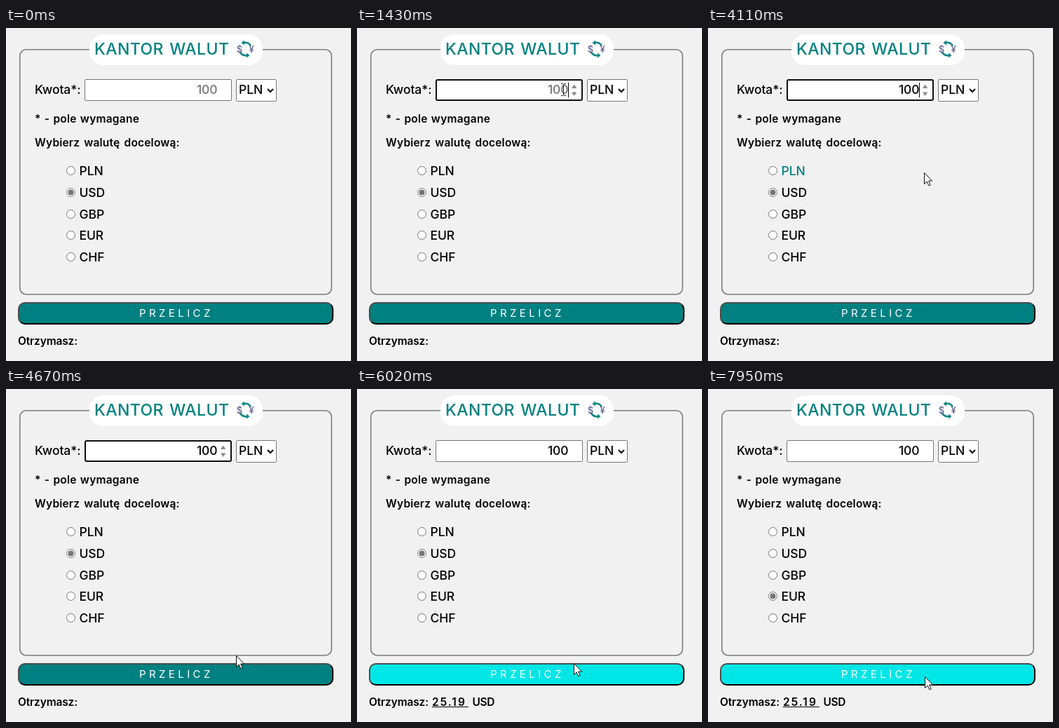
An HTML page for the animation above (8000 ms loop, 492x475 px).

```html
<!DOCTYPE html>
<html lang="pl">
<head>
<meta charset="utf-8">
<title>Kantor walut</title>
<style>
  html, body { margin: 0; width: 100%; height: 100%; overflow: hidden; background: #f1f1f1; }
  svg { display: block; width: 492px; height: 475px; font-family: Inter, "Noto Sans", sans-serif; font-weight: 500; }
  .big { font-size: 17.5px; letter-spacing: -.1px; }
  .mid { font-size: 15.5px; font-weight: 600; }
  .line { fill: none; }
</style>
</head>
<body>
<svg viewBox="0 0 492 475">
  <rect width="492" height="475" fill="#f1f1f1"/>
  <rect x="19.8" y="30.8" width="444.5" height="349.2" rx="9" class="line" stroke="#7c7c7c" stroke-width="1.6"/>
  <rect x="119" y="9" width="247" height="44" rx="20" fill="#fff"/>
  <text x="126" y="38" font-size="23" letter-spacing=".4" word-spacing="2" fill="#008080">KANTOR WALUT</text>

  <g class="line" stroke="#0d8584" stroke-width="2.5">
    <path d="M339 21A9.5 9.5 0 0 1 349 25.5"/>
    <path d="M344 39A9.5 9.5 0 0 1 334 34.5"/>
  </g>
  <path d="M335.5 21L340 17.5V24.5ZM347.5 39L343 35.5V42.5Z" fill="#0d8584"/>
  <g font-size="13" fill="#625f8e" text-anchor="middle">
    <text x="333" y="35">$</text>
    <text x="350" y="35">¥</text>
  </g>

  <text class="big" x="41" y="94">Kwota*:</text>
  <rect id="field" fill="#fff"/>
  <text id="amount" class="big" x="301.5" y="94" text-anchor="end"></text>
  <path id="spin" d="M306 86L309.7 80.5L313.4 86ZM306 91.5L309.7 97L313.4 91.5Z" fill="#8b8b8b"/>
  <rect id="caret" x="301" y="78" width="1" height="21"/>
  <rect x="328.5" y="73.5" width="57" height="31" rx="1" fill="#fff" stroke="#767676"/>
  <text class="big" x="332" y="94">PLN</text>
  <path d="M373 87L377 91L381 87" class="line" stroke="#000" stroke-width="2"/>

  <text class="mid" x="41" y="135" letter-spacing=".25" word-spacing="1">* - pole wymagane</text>
  <text class="mid" x="41" y="169" letter-spacing=".2" word-spacing="2">Wybierz walutę docelową:</text>
  <g id="options"></g>

  <rect id="button" x="18" y="392" width="448" height="30" rx="9"/>
  <g class="line" stroke-width="2">
    <path id="edgeTop" d="M20.64 419.36A9 9 0 0 1 18 413V401A9 9 0 0 1 27 392H457A9 9 0 0 1 463.36 394.64"/>
    <path id="edgeBottom" d="M463.36 394.64A9 9 0 0 1 466 401V413A9 9 0 0 1 457 422H27A9 9 0 0 1 20.64 419.36"/>
  </g>
  <text x="190" y="412" font-size="15" font-weight="400" letter-spacing="4.4" fill="#fff">PRZELICZ</text>

  <text class="mid" x="17" y="452" letter-spacing="-.15">Otrzymasz:</text>
  <g id="result">
    <text class="mid" x="107" y="452" letter-spacing="2">25.19</text>
    <rect x="107" y="453" width="52" height="1"/>
    <text class="mid" x="164.5" y="452" letter-spacing="-.4">USD</text>
  </g>

  <g id="pointer">
    <circle id="click" cx="-1" cy="0" r="12" fill="#ffee00" opacity=".6"/>
    <path id="arrow" d="M-.5 -.5V15.5L3.2 12L5.8 17.8L8.2 16.8L5.7 11.1H10.6Z" fill="#fff" stroke="#111"/>
    <path id="beam" d="M-3 -8.5H-1L.5 -7.5L2 -8.5H4M-3 8.5H-1L.5 7.5L2 8.5H4M.5 -7.5V7.5" class="line" stroke="#222"/>
  </g>
</svg>
<script>
const LOOP = 8000, STEP = 70;
const el = id => document.getElementById(id);
const set = (node, attrs) => { for (const k in attrs) node.setAttribute(k, attrs[k]); };
const show = (id, on) => set(el(id), { visibility: on ? 'visible' : 'hidden' });
const within = (t, a, b) => t >= a && t < b;

const rows = ['PLN', 'USD', 'GBP', 'EUR', 'CHF'].map((name, i) => {
  const y = Math.round(203 + 30.75 * i) + .5;
  const add = (tag, attrs) => {
    const node = document.createElementNS('http://www.w3.org/2000/svg', tag);
    set(node, attrs);
    return el('options').appendChild(node);
  };
  const ring = add('circle', { cx: 92.5, cy: y, r: 6, fill: '#fff', stroke: '#767676' });
  const dot = add('circle', { cx: 92.5, cy: y, r: 4 });
  const label = add('text', { class: 'big', x: 104.5, y: y + 6.5 });
  label.textContent = name;
  return { y, ring, dot, label };
});

// Pointer moves: start, number of steps, from, to, easing.
const smooth = p => (1 - Math.cos(Math.PI * p)) / 2;
const soft = p => .3 * p + .7 * smooth(p);
const out = p => 1 - (1 - p) ** 1.35;
const moves = [
  [460, 10, [381, 404], [294, 88], soft],
  [3770, 11, [294, 88], [329, 361], soft],
  [4600, 5, [329, 361], [329, 402], out],
  [5950, 12, [329, 402], [130, 299], soft],
  [7380, 9, [130, 299], [310, 411], soft]
];

function pointerAt(t) {
  let pos = moves[0][2];
  moves.forEach(([begin, n, from, to, ease], i) => {
    if (t < begin) return;
    const k = Math.min(n - 1, Math.floor((t - begin) / STEP + .01));
    const p = ease(i ? (k + 1) / n : k / (n - 1));
    pos = from.map((v, j) => v + (to[j] - v) * p);
  });
  return pos;
}

function draw(t) {
  const [x, y] = pointerAt(t);
  const seen = t >= 460;
  const inField = seen && x > 112 && x < 322 && y > 73 && y < 104;
  const focus = within(t, 1360, 5090);
  const clicking = within(t, 1360, 1430) || within(t, 5090, 5220) || within(t, 6790, 6920);

  set(el('field'), focus
    ? { x: 113, y: 74, width: 208, height: 29, rx: 2, stroke: '#101010', 'stroke-width': 2 }
    : { x: 112.5, y: 73.5, width: 209, height: 30, rx: 1.5, stroke: inField ? '#4f4f4f' : '#767676', 'stroke-width': 1 });
  const typed = t >= 2440;
  el('amount').textContent = !typed || t >= 3040 ? '100' : t >= 2840 ? '10' : '1';
  set(el('amount'), { fill: typed ? '#000' : '#757575' });
  show('spin', focus || inField);
  show('caret', within(t, 1360, 1910) || within(t, 2440, 3570) || within(t, 4100, 4600));

  const chosen = t >= 6920 ? 3 : 1;
  rows.forEach((row, i) => {
    const hover = seen && Math.abs(y - row.y) < 15;
    const tone = hover && x < 150 ? '#555' : '#757575';
    set(row.label, { fill: hover ? '#008080' : '#000' });
    set(row.ring, { stroke: tone });
    set(row.dot, { fill: i === chosen ? tone : 'none' });
  });

  const pressed = within(t, 5090, 5220);
  set(el('button'), { fill: t > 4000 && y >= 391 ? '#00e6e6' : '#008080' });
  set(el('edgeTop'), { stroke: pressed ? '#000' : '#4c4c4c' });
  set(el('edgeBottom'), { stroke: pressed ? '#4c4c4c' : '#000' });
  show('result', t >= 5220);

  set(el('pointer'), { transform: `translate(${Math.round(x)} ${Math.round(y)})` });
  show('click', clicking);
  show('arrow', seen && !inField);
  show('beam', inField);
}

const start = performance.now();
function tick(now) {
  draw(Math.max(0, now - start) % LOOP);
  requestAnimationFrame(tick);
}
draw(0);
requestAnimationFrame(tick);
</script>
</body>
</html>
```
